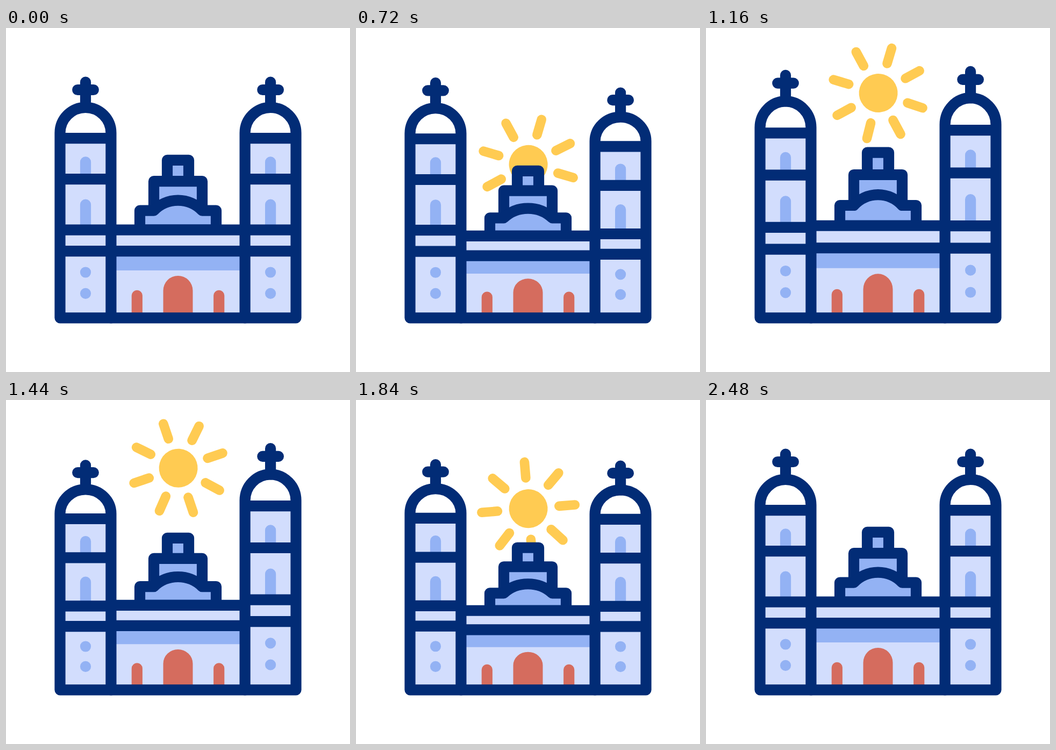
These frames come from a looping animation (640x640 px, 3 s). An HTML page:

```html
<!DOCTYPE html>
<html lang="en">
<head>
<meta charset="utf-8">
<title>Cathedral at sunrise</title>
<style>
  html, body { margin: 0; width: 100%; height: 100%; overflow: hidden; background: #fff; }
  svg { display: block; }
  path { vector-effect: non-scaling-stroke; fill: none; stroke-width: 20.2; stroke-linecap: round; stroke-linejoin: round; }
  .line { stroke: #022c76; }
  .blueLine { stroke: #93b2f4; }
  .redLine { stroke: #d56c5e; }
  .ray { stroke: #ffcb52; stroke-width: 17.6; }
  .pale { fill: #d2ddfd; }
  .blue { fill: #93b2f4; }
  .red { fill: #d56c5e; }
  .sun { fill: #ffcb52; }
</style>
</head>
<body>
<svg id="stage" width="640" height="640"></svg>
<script>
const LOOP = 3000, GROUND = 539.3;

const tower = id => `<g id="${id}">
  <path class="pale" d="M100.5 205H195.4V539H100.5z"/>
  <path class="blueLine" d="M148 249.4V275M148 328.6V370M148 454.5h.01M148 493.8h.01"/>
  <path class="line" d="M100.5 539.3V195.3A47.45 47.45 0 0 1 195.4 195.3V539.3z
    M100.5 205.2h94.9M100.5 281.2h94.9M100.5 375.6h94.9M100.5 415.2h94.9
    M148 148V100.7M133.2 115h29.6"/>
</g>`;

const nave = `<g id="nave">
  <path class="blue" d="M300 245.8h40V285h-40zM275 285h90v55h-90z"/>
  <path class="line" d="M300 285V245.8h40V285M275 340V285.2h90V340"/>
  <path class="blue line" d="M249 375.6V339.6H275A63 63 0 0 1 365 339.6H391V375.6z"/>
  <path class="pale" d="M195 375.6H445V539H195z"/>
  <path class="blue" d="M195 415H445V451H195z"/>
  <path class="redLine" d="M243.8 497.8V530M396.2 497.8V530"/>
  <path class="red" d="M292.5 539V488.5a27.5 27.5 0 0 1 55 0V539z"/>
  <path class="line" d="M195.4 375.6H444.6M195.4 415.2H444.6M195.4 539.3H444.6"/>
</g>`;

// The two lower diagonal rays lean slightly downwards.
const rays = [0, 47, 90, 132.5, 180, 225, 270, 315].map(angle =>
  `<path class="ray" d="M57.4 0H87" transform="rotate(${angle})"/>`).join('');

document.getElementById('stage').innerHTML =
  `<g id="sun"><circle class="sun" r="36"/>${rays}</g>` + nave + tower('left') + tower('right');

const clamp = (v, low, high) => Math.min(high, Math.max(low, v));
const ease = u => (u = clamp(u, 0, 1), u * u * (3 - 2 * u));

// Squash, stretch, squash and settle: one bounce shared by all parts.
const PEAK = 1.05;
function bounce(t, low) {
  return 1 + (low - 1) * ease(t / 400)
    + (PEAK - low) * (ease((t - 400) / 600) - ease((t - 1000) / 600))
    + (1 - low) * ease((t - 1600) / 600);
}

const parts = [
  { id: 'left', x: 0, delay: 0, low: .932 },
  { id: 'nave', x: 0, delay: 120, low: .89 },
  { id: 'right', x: 344.1, delay: 240, low: .95 },
];

const place = (id, transform) => document.getElementById(id).setAttribute('transform', transform);

function drawSun(t) {
  const fromApex = t - 1160;
  const u = clamp(fromApex / (fromApex < 0 ? 593 : 1080), -1, 1);
  const y = 121 + 325 * Math.abs(u) ** 3;
  const angle = -28.4 + (u < 0 ? -82 * u * u : 37.6 * u);
  place('sun', `translate(320.6 ${y}) rotate(${angle})`);
}

function draw(t) {
  for (const { id, x, delay, low } of parts) {
    const k = bounce(t - delay, low);
    place(id, `translate(${x} ${GROUND * (1 - k)}) scale(1 ${k})`);
  }
  drawSun(t);
}

let start;
function tick(now) {
  start ??= now;
  draw((now - start) % LOOP);
  requestAnimationFrame(tick);
}
draw(0);
requestAnimationFrame(tick);
</script>
</body>
</html>
```
